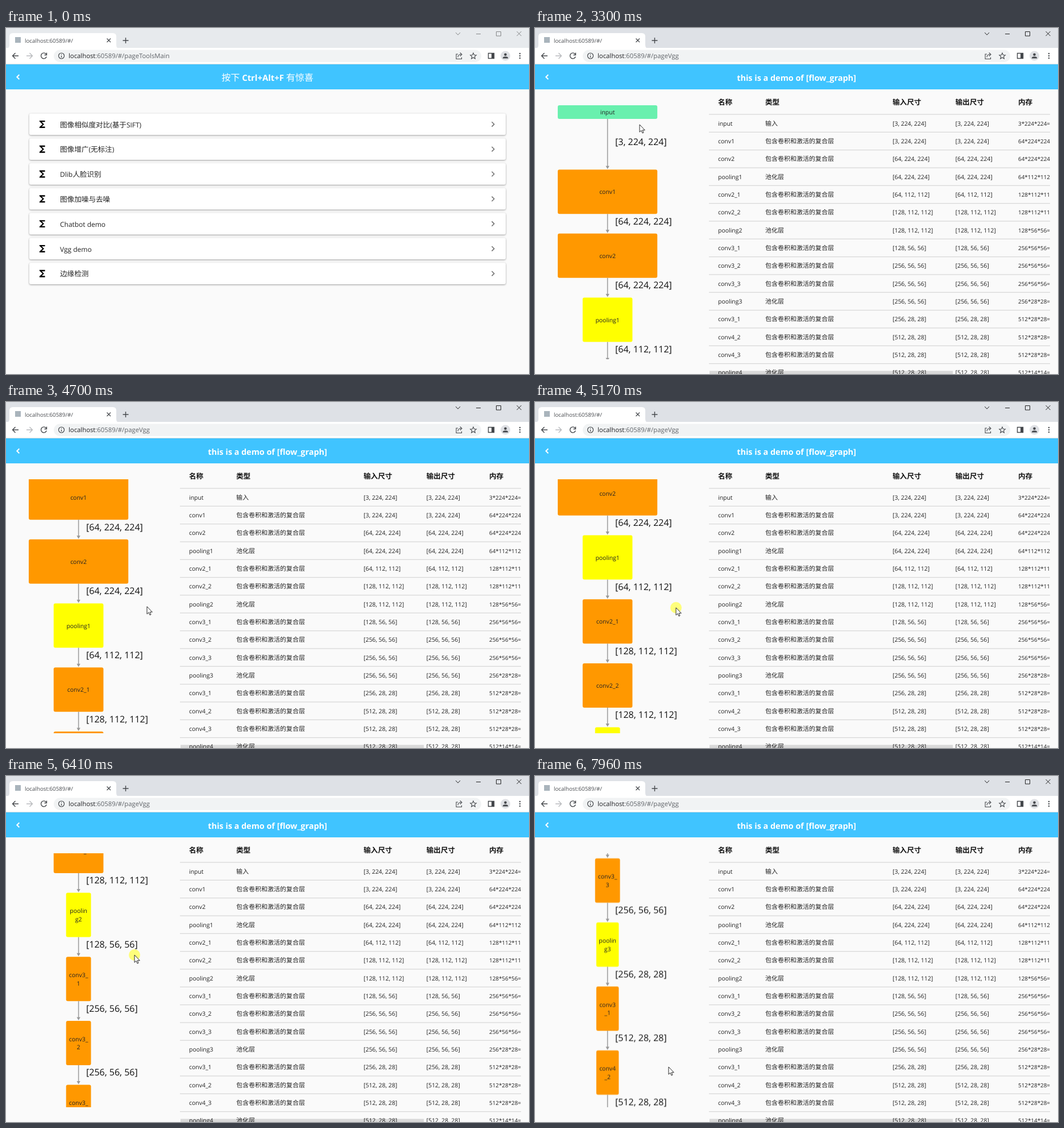
Recreate the animation shown at these times as an HTML page. Size 920x609 px, loop 8000 ms.

```html
<!DOCTYPE html>
<html lang="zh-CN">
<head>
<meta charset="utf-8">
<title>flow_graph demo</title>
<style>
html, body { margin: 0; width: 100%; height: 100%; overflow: hidden; background: #fafafa; }
svg { display: block; width: 920px; height: 609px; }
text { font-family: 'Open Sans', 'Noto Sans CJK SC', 'Noto Sans CJK', sans-serif; text-rendering: geometricPrecision; fill: #222; }
tspan { font-size: .95em; }
.line { fill: none; stroke: #45484c; stroke-width: 1.4; }
.mid { text-anchor: middle; }
.head { fill: #fff; }
.head tspan { font-weight: 700; font-size: .93em; }
.th { font-weight: 700; fill: #111; }
.card { fill: #fff; filter: drop-shadow(0 1.5px 1.5px rgba(0, 0, 0, .38)); }
</style>
</head>
<body>
<svg id="stage" viewBox="0 0 920 609" xmlns="http://www.w3.org/2000/svg"></svg>
<script>
const LOOP = 8000, START = 657, STEP = 77.65;
const $ = id => document.getElementById(id);

// ---------- drawing helpers ----------
const rect = (x, y, w, h, fill, r = 0, extra = '') =>
  `<rect x="${x}" y="${y}" width="${w}" height="${h}" rx="${r}" fill="${fill}" ${extra}/>`;
const line = (d, extra = '') => `<path class="line" d="${d}" ${extra}/>`;
// Latin runs are set slightly smaller than the Chinese ones
const text = (x, y, size, str, extra = '') =>
  `<text x="${x}" y="${y}" font-size="${size}" ${extra}>` +
  str.replace(/[\x20-\x7e]+/g, '<tspan>$&</tspan>') + '</text>';

// ---------- browser window ----------
function browser() {
  const star = Array.from({ length: 10 }, (_, i) => {
    const a = i * Math.PI / 5 - Math.PI / 2, r = i % 2 ? 2.5 : 5.6;
    return (822 + r * Math.cos(a)).toFixed(1) + ' ' + (49.5 + r * Math.sin(a)).toFixed(1);
  }).join('L');
  const url = (id, page) => `<g id="${id}">` +
    `<text x="110" y="53" font-size="11.3" style="fill:#202124">localhost<tspan style="font-size:1em;fill:#5f6368">:60589/#/${page}</tspan></text></g>`;
  return rect(0, 0, 920, 36, '#dee1e6') +
    rect(0, 0, 920, 36, '#e7eaed', 0, 'id="idle"') +
    rect(0, 35, 920, 29, '#fff') + rect(0, 63, 920, 1, '#dcdee1') +
    '<path d="M0 36Q6 36 6 30V15Q6 9 12 9H188Q194 9 194 15V30Q194 36 200 36Z" fill="#fff"/>' +
    rect(16, 16, 10, 10, '#a9b4bc') +
    text(33, 25.5, 10.3, 'localhost:60589/#/', 'style="fill:#4a4d51"') +
    line('M177.5 18.5l6.5 6.5m0-6.5l-6.5 6.5', 'style="stroke-width:1.2"') +
    line('M205.5 22h10m-5-5v10') +
    '<g id="controls">' +
    line('M791 8l4 4.2 4-4.2M827 10.5h8M862.5 6.5h8v7.5h-8zM898.5 6l8 8m0-8l-8 8', 'style="stroke:#222;stroke-width:1"') +
    '</g>' +
    line('M22 49H11.5M16.5 44l-5 5 5 5') +
    line('M36 49h10.5M41.5 44l5 5-5 5', 'style="stroke:#b9bbbe"') +
    line('M70.7 46A5 5 0 1 0 71.3 50.5M71.5 43.5v4h-4') +
    rect(84, 38.5, 752, 21.5, '#f1f3f4', 10.7) +
    line('M92.5 49a5 5 0 1 0 10 0a5 5 0 1 0-10 0M97.5 48.4v3.6M97.5 45.8v1.3', 'style="stroke-width:1.2"') +
    url('urlList', 'pageToolsMain') + url('urlVgg', 'pageVgg') +
    line(`M795 46h-3v8.5h9.5v-3M795 51.5c0-3.5 2-5 5.5-5M798.7 43.5l3.3 3-3.3 3M${star}Z`, 'style="stroke-width:1.1"') +
    line('M848.5 44.5h10v9h-10z') + rect(854, 44.5, 4.5, 9, '#45484c') +
    '<circle cx="878.5" cy="49" r="8.5" fill="#dfe1e5"/><circle cx="878.5" cy="46.8" r="2.3" fill="#45484c"/>' +
    '<path d="M873.7 53.5q0-3.2 4.8-3.2t4.8 3.2z" fill="#45484c"/>' +
    [45, 49, 53].map(y => `<circle cx="904" cy="${y}" r="1.2" fill="#45484c"/>`).join('');
}

// ---------- list page ----------
function listPage() {
  const items = ['图像相似度对比(基于SIFT)', '图像增广(无标注)', 'Dlib人脸识别', '图像加噪与去噪',
    'Chatbot demo', 'Vgg demo', '边缘检测'];
  const top = i => 150.4 + 43.8 * i;
  const cards = items.map((label, i) => {
    const y = top(i), c = y + 19;
    return rect(41, y, 838, 37.8, '#fff', 3, 'class="card"') +
      `<path transform="translate(54 ${c - 9.7}) scale(.81)" d="M18 4H6v2l6.5 6L6 18v2h12v-3h-7l5-5-5-5h7z"/>` +
      text(95, c + 5.2, 12.6, label) +
      line(`M854.5 ${c - 4.2}l4.2 4.2-4.2 4.2`, 'style="stroke:#757575;stroke-width:1.6"');
  }).join('');
  const cover = (id, i) => rect(41, top(i), 838, 37.8, '#000', 3, `id="${id}"`);
  return cards + cover('hoverVgg', 5) + cover('hoverEdge', 6) +
    '<g clip-path="url(#row)"><g transform="translate(190 389)"><circle id="ripple" r="76" fill-opacity=".062"/></g></g>' +
    `<clipPath id="row">${rect(41, top(5), 838, 37.8, '#000', 3)}</clipPath>`;
}

// ---------- network: name, channels, side ----------
const layers = [
  ['input', 3, 224], ['conv1', 3, 224], ['conv2', 64, 224], ['pooling1', 64, 224],
  ['conv2_1', 64, 112], ['conv2_2', 128, 112], ['pooling2', 128, 112],
  ['conv3_1', 128, 56], ['conv3_2', 256, 56], ['conv3_3', 256, 56], ['pooling3', 256, 56],
  ['conv3_1', 256, 28], ['conv4_2', 512, 28], ['conv4_3', 512, 28], ['pooling4', 512, 28], ['conv5_1', 512, 14]
];
const shape = ([, c, s]) => `[${c}, ${s}, ${s}]`;

function table() {
  const cols = [322, 405, 629, 739.5, 850];
  const row = (cells, y, size, extra) => cells.map((s, i) => text(cols[i], y, size, s, extra)).join('');
  const body = layers.slice(0, -1).map((l, i) => {
    const [name] = l, [, c, s] = layers[i + 1];
    const kind = name === 'input' ? '输入' : name.startsWith('pool') ? '池化层' : '包含卷积和激活的复合层';
    const y = 152 + 31.33 * i, base = y + 19.8;
    return rect(306, y - .6, 600, 1.3, '#d9d9d9') +
      row([name, kind, shape(l), shape(l)], base, 11) +
      text(cols[4], base, 10.4, `${c}*${s}*${s}=${c * s * s}`);
  }).join('');
  return '<clipPath id="tableClip"><path d="M306 108h600v501H306z"/></clipPath><g clip-path="url(#tableClip)">' +
    row(['名称', '类型', '输入尺寸', '输出尺寸', '内存'], 135, 12.6, 'class="th"') + body +
    rect(307, 603.5, 428, 6, '#000', 0, 'id="bar" fill-opacity=".13"') + '</g>';
}

function graph() {
  const cx = 127.6, pitch = 112.67;
  const top = i => i ? 249.2 + pitch * (i - 1) : 136;
  const nodes = layers.slice(0, -1).map(([name], i) => {
    const next = layers[i + 1], w = Math.max(next[2] * .782, 39.5), h = i ? 78 : 24;
    const y = top(i), end = y + h, to = top(i + 1), pool = name.startsWith('pool');
    const fill = !i ? '#69f0ae' : pool ? '#ff0' : '#ff9800';
    const cut = w > 80 ? 9 : pool || w > 42 ? 6 : 5;
    const lines = [name.slice(0, cut), name.slice(cut)].filter(Boolean);
    return rect(cx - w / 2, y, w, h, fill, 3) +
      lines.map((s, k) => text(cx, y + h / 2 + 4 + (k - (lines.length - 1) / 2) * 14.7, 11, s, 'class="mid"')).join('') +
      line(`M${cx} ${end}V${to - 4}`, 'style="stroke:#999;stroke-width:1.5"') +
      `<path d="M${cx - 3.2} ${to - 6.5}h6.4l-3.2 5.5z" fill="#999"/>` +
      text(141, (end + to) / 2 + 1, 16.86, shape(next), 'style="fill:#111"');
  }).join('');
  return '<clipPath id="graphClip"><path d="M30 136h270v447H30z"/></clipPath>' +
    `<g id="graph" clip-path="url(#graphClip)"><g id="scroll">${nodes}</g></g>`;
}

$('stage').innerHTML = rect(0, 0, 920, 609, '#fafafa') + browser() +
  rect(0, 64, 920, 44, '#40c4ff') +
  line('M23.3 82.2l-4 4 4 4', 'style="stroke:#fff;stroke-width:2"') +
  `<g id="list">${text(460, 93, 16, '按下 Ctrl+Alt+F 有惊喜', 'class="head mid"')}${listPage()}</g>` +
  `<g id="vgg">${text(460, 93, 15.5, 'this is a demo of [flow_graph]', 'class="head mid"')}${table()}${graph()}</g>` +
  '<g id="cursor"><circle id="press" r="10" fill="#ffff50" fill-opacity=".75"/>' +
  '<path d="M0 0V13.2L3 10.4L5 15L7 14.1L5.1 9.8H9.3Z" fill="#fff" stroke="#111" stroke-width=".9"/></g>';

function play(id, prop, keys, stepped) {
  const frames = keys.map(([n, value], i) => {
    const next = keys[i + 1];
    return {
      offset: (START + STEP * n) / LOOP,
      [prop]: value,
      easing: stepped && next ? `steps(${next[0] - n})` : 'step-end'
    };
  });
  const first = frames[0], last = frames[frames.length - 1];
  $(id).animate([{ ...first, offset: 0, easing: 'step-end' }, ...frames, { ...last, offset: 1 }],
    { duration: LOOP, iterations: Infinity });
}
const fade = (id, before, ...keys) => play(id, 'opacity', [[-1, before], ...keys]);

fade('idle', 1, [15, 0]);
fade('controls', .5, [15, 1]);
fade('urlList', 1, [17, 0]);
fade('urlVgg', 0, [17, 1]);
fade('hoverEdge', 0, [10, .04], [12, 0]);
fade('hoverVgg', 0, [12, .04], [15, .07], [17, .094]);
fade('list', 1, [21, 0]);
fade('vgg', 0, [21, 1]);
fade('graph', 0, [22, 1]);
fade('bar', 0, [24, .5], [25, 1]);
fade('cursor', 0, [0, 1]);
play('ripple', 'transform', [[14, 'scale(0)'], [15, 'scale(.25)'], [18, 'scale(1)']], true);

// step, x, y, button held
const path = [
  [0, 684, 562], [4, 373, 525], [5, 373, 525], [10, 240, 440], [13, 190, 389],
  [15, 190, 389, 1], [17, 190, 389], [26, 190, 389], [28, 235, 428], [30, 407, 300],
  [32, 300, 104], [33, 166, 130], [34, 184, 170], [37, 181, 150], [39, 181, 150],
  [41, 300, 104], [42, 407, 180], [44, 213, 364], [45, 213, 364], [46, 243, 402],
  [48, 246, 480, 1], [52, 248, 360], [55, 247, 482, 1], [58, 248, 362, 1], [59, 248, 322],
  [62, 240, 490, 1], [66, 238, 330], [69, 228, 482, 1], [74, 226, 315, 1], [75, 226, 305],
  [78, 236, 500, 1], [82, 238, 310], [85, 236, 500, 1], [89, 236, 301.5], [94, 235, 512]
];
let offset = 0;
const scroll = path.map(([n, , y], i) => {
  const prev = path[i - 1];
  if (prev && prev[3]) offset += y - prev[2];
  return [n, `translate(0px, ${offset}px)`];
});
play('cursor', 'transform', path.map(([n, x, y]) => [n, `translate(${x}px, ${y}px)`]), true);
play('scroll', 'transform', scroll, true);
fade('press', 0, ...path.map(([n, , , held]) => [n, held ? 1 : 0]));
</script>
</body>
</html>
```
